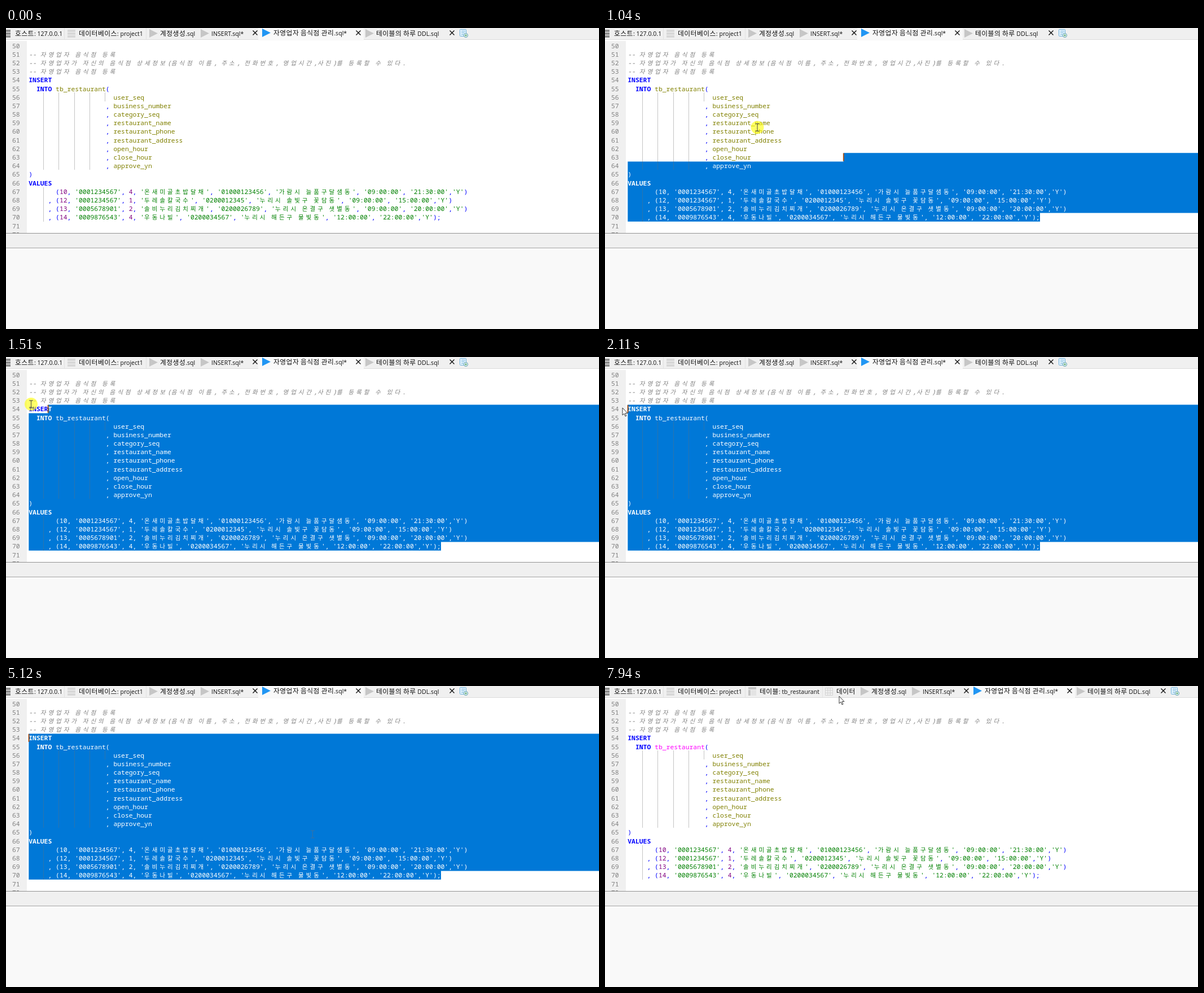
Recreate the animation shown at these times as an HTML page. Size 1051 by 533 pixels, loop 8 s.

```html
<!DOCTYPE html>
<html lang="ko">
<head>
<meta charset="utf-8">
<title>SQL editor</title>
<style>
html, body { margin: 0; width: 100%; height: 100%; overflow: hidden; background: #fff; }
#stage { position: relative; width: 1051px; height: 533px; overflow: hidden; }
#stage > * { position: absolute; left: 0; top: 0; }
svg { width: 1051px; height: 533px; overflow: visible; }
svg text { font: 10.6px "Open Sans", "Noto Sans", sans-serif; fill: #111; white-space: pre; }
svg .h { font: 11.8px "Noto Sans CJK KR", "Noto Sans CJK", sans-serif; letter-spacing: .45px; }
.code { box-sizing: border-box; width: 1051px; height: 363px; overflow: hidden; margin: 0; padding: 23.6px 0 0 40.3px;
  font: 11.38px/15.2px "Noto Sans Mono", "DejaVu Sans Mono", monospace; white-space: pre; }
.code div { height: 15.2px; }
.code i { display: inline-block; width: 13.656px; line-height: 0; font-style: inherit;
  font-family: "Noto Sans CJK KR", "Noto Sans CJK", sans-serif; font-size: 10.5px; }
#gutter { padding-left: 11px; color: #808080; }
.c { color: #808080; font-style: italic; }
.k { color: #00f; font-weight: bold; }
.p { color: #00f; }
.s { color: #008000; }
.d { color: #800080; }
.n, .t { color: #808000; }
.known .t { color: #f0f; }
#sel { background: #0078d7; }
#sel span { color: #fff; }
#caret { width: 1.5px; height: 14px; }
</style>
</head>
<body>
<div id="stage">
  <svg id="frame"></svg>
  <div id="gutter" class="code"></div>
  <div id="code" class="code"></div>
  <div id="sel" class="code"></div>
  <svg id="guides"></svg>
  <div id="caret"></div>
  <svg id="pointer">
    <circle r="11.5" fill="#ff0" fill-opacity=".6"/>
    <path id="arrow" d="M0 0V13L3 10.2 5 15 7 14.2 5 9.6H9Z" fill="#fff" stroke="#222" stroke-width=".9"/>
    <path id="beam" d="M-3.5-6.5H3.5M0-6.5V6.5M-3.5 6.5H3.5" fill="none"/>
    <path id="resize" d="M0-9L3.5-5H.8V5H3.5L0 9-3.5 5H-.8V-5H-3.5Z" fill="#222" stroke="#fff" stroke-width=".4"/>
  </svg>
</div>
<script>
const LOOP = 8000, TICK = 67, W = 1051;
const LEFT = 40.3, TOP = 23.6, CELL = 6.828, ROW = 15.2, LAST = 20, END = 771;
const $ = id => document.getElementById(id);
const rowTop = i => TOP + i * ROW;

const source = `
-- 자영업자 음식점 등록
-- 자영업자가 자신의 음식점 상세정보(음식점 이름, 주소, 전화번호, 영업시간,사진)를 등록할 수 있다.
-- 자영업자 음식점 등록
INSERT
  INTO tb_restaurant(
                      user_seq
                    , business_number
                    , category_seq
                    , restaurant_name
                    , restaurant_phone
                    , restaurant_address
                    , open_hour
                    , close_hour
                    , approve_yn
)
VALUES
       (10, '0001234567', 4, '온새미골초밥달채', '01000123456', '가람시 늘품구달샘동', '09:00:00', '21:30:00','Y')
     , (12, '0001234567', 1, '두레솔칼국수', '0200012345', '누리시 솔빛구 꽃담동', '09:00:00', '15:00:00','Y')
     , (13, '0005678901', 2, '솔비누리김치찌개', '0200026789', '누리시 은결구 샛별동', '09:00:00', '20:00:00','Y')
     , (14, '0009876543', 4, '우동나빌', '0200034567', '누리시 해든구 물빛동', '12:00:00', '22:00:00','Y');`;

// Syntax colours
const span = (cls, s) => `<span class="${cls}">${s}</span>`;
function kind(word) {
  if (word[0] === "'") return 's';
  if (/^\d/.test(word)) return 'd';
  if (/^[A-Z]/.test(word)) return 'k';
  if (word.startsWith('tb_')) return 't';
  return /^[a-z]/.test(word) ? 'n' : 'p';
}
function paint(line) {
  const html = line.startsWith('--') ? span('c', line)
    : line.replace(/'[^']*'|[A-Z]+|[a-z_]+|\d+|[(),;]/g, w => span(kind(w), w));
  return `<div>${html.replace(/[가-힣]/g, '<i>$&</i>')}</div>`;
}
$('code').innerHTML = $('sel').innerHTML = source.split('\n').map(paint).join('');
$('gutter').innerHTML = Array.from({ length: 23 }, (_, i) => `<div>${50 + i}</div>`).join('');

// Window frame and tabs
const rect = (x, y, w, h, fill) => `<rect x="${x}" y="${y}" width="${w}" height="${h}" fill="${fill}"/>`;
const path = (d, color, width = 1) => `<path d="${d}" fill="none" stroke="${color}" stroke-width="${width}"/>`;
const label = (x, s, y = 14) =>
  `<text x="${x}" y="${y}">${s.replace(/[가-힣]+/g, '<tspan class="h">$&</tspan>')}</text>`;
const play = (x, y = 2, fill = '#c6c6c6') => `<path d="M${x} ${y}l15 7.5-15 7.5z" fill="${fill}"/>`;
const cross = x => path(`M${x - 4} 4.5l8 8m0-8l-8 8`, '#111', 1.4);
const bars = (x, w, fill) => [3, 8, 13].map(y => rect(x, y, w, 4, fill)).join('');

const queries =
  play(254) + label(273, '계정생성.sql') +
  play(345) + label(364, 'INSERT.sql*') + cross(441.5) +
  rect(447, 0, 187, 22, '#f9f9f9') +
  play(454, 1, '#2196f3') + label(474, '자영업자 음식점 관리.sql*', 12.5) + cross(624.5) +
  play(637) + label(656, '테이블의 하루 DDL.sql') + cross(790.5) +
  `<rect x="804.5" y="2.5" width="11" height="12" rx="1" fill="#eaf5fc" stroke="#69b1de"/>` +
  path('M807 5.5h7M807 8.5h6M807 11.5h4', '#69b1de') +
  '<circle cx="815" cy="13" r="3.5" fill="#fff" stroke="#4b97a8"/>' + path('M813 13h4M815 11v4', '#3c9a5f');

const tableTabs =
  rect(254, 2, 14, 4, '#c4c4c4') + rect(254, 7, 4, 10, '#c4c4c4') + rect(259, 7, 9, 10, '#e4e4e4') +
  label(274, '테이블: tb_restaurant') + path('M385.5 0V20', '#e2e2e2') +
  path('M390.5 3.5h13v13h-13zM390.5 7.8h13M390.5 12.2h13M394.8 3.5v13M399.2 3.5v13', '#d2d2d2') +
  label(410, '데이터');

$('frame').innerHTML =
  rect(0, 0, W, 20, '#f0f0f0') + rect(0, 20, W, 1, '#dcdcdc') + rect(0, 23, 37, 340, '#f0f0f0') +
  rect(0, 363, W, 1, '#929292') + rect(0, 364, W, 25, '#f0f0f0') + rect(0, 389, W, 1, '#a5a5a5') +
  rect(0, 390, W, 143, '#f9f9f9') +
  path('M103.5 0V20M248.5 0V20', '#e2e2e2') +
  bars(0, 8, '#8c8c8c') + label(16, '호스트: 127.0.0.1') +
  bars(109, 14, '#d8d8d8') + label(129, '데이터베이스: project1') +
  `<g id="tableTabs">${tableTabs}</g><g id="queries">${queries}</g>`;

$('guides').innerHTML = path(
  'M66.5 114V251M93.5 114V251M121.5 114V251M148.5 114V251M175.5 114V130M66.5 282V343',
  'rgba(110,110,110,.4)');

// Pointer: time, x, y; a trailing 1 glides to the next stop, null hides it
const stops = [
  [0, null], [140, 921, 453], [210, 814.5, 364],
  [360, 804, 355, 1], [630, 783.5, 338.5], [770, 780, 337], [840, 766, 334], [900, 737, 330],
  [970, 424.5, 235.5], [1040, 270, 176], [1110, 185, 150], [1170, 156, 138],
  [1240, 152, 124, 1], [1510, 44.5, 83.5], [1580, 36, 82], [1640, 31, 81, 1], [1910, 30.5, 90.5],
  [2110, 31, 90, 1], [2320, 139, 97],
  [3530, 260, 170, 1], [3660, 542, 279, 1], [3800, 167, 252],
  [4460, 150, 220, 1], [4590, 100, 170],
  [4990, 683, 471], [5060, 610, 350], [5120, 543.5, 262.5], [5660, null],
  [7320, 20, 147, 1], [7600, 190, 75, 1], [7940, 415, 18]
];
function pointerAt(t) {
  const i = stops.findLastIndex(s => s[0] <= t);
  const [t0, x, y, glide] = stops[i];
  if (x === null) return null;
  if (!glide) return { x, y };
  const [t1, x1, y1] = stops[i + 1];
  const k = Math.floor((t - t0) / TICK) * TICK / (t1 - t0);
  return { x: x + (x1 - x) * k, y: y + (y1 - y) * k };
}

// The selection head trails the pointer by one tick
function headAt(t) {
  const p = pointerAt(Math.min(t, 2050) - TICK);
  const row = Math.min(LAST, Math.floor((p.y - TOP) / ROW));
  const cell = Math.max(0, Math.round((p.x - LEFT) / CELL));
  const x = LEFT + cell * CELL;
  return { row, x: row === LAST ? Math.min(END, x) : x };
}
function region({ row, x }) {
  const low = rowTop(LAST), bottom = low + ROW;
  const pts = row === LAST
    ? [[x, low], [END, low], [END, bottom], [x, bottom]]
    : [[x, rowTop(row)], [W, rowTop(row)], [W, low], [END, low], [END, bottom],
       [LEFT, bottom], [LEFT, rowTop(row + 1)], [x, rowTop(row + 1)]];
  return `polygon(${pts.map(([a, b]) => `${a}px ${b}px`).join(',')})`;
}

const show = (el, on) => { el.style.display = on ? '' : 'none'; };

function drawPointer(t, head) {
  const p = pointerAt(t);
  show($('pointer'), p);
  if (!p) return;
  const { x, y } = p;
  const resize = Math.abs(y - 364) < 4;
  const arrow = !resize && (x < 37 || y < 22 || y > 364);
  const onBlue = head && y > rowTop(head.row) && y < rowTop(LAST) && t > 2100;
  $('pointer').style.transform = `translate(${x}px,${y}px)`;
  show($('pointer').firstElementChild, t >= 560 && t < 2110);
  show($('arrow'), arrow);
  show($('resize'), resize);
  show($('beam'), !arrow && !resize);
  $('beam').setAttribute('stroke', onBlue ? '#3a71a3' : '#444');
}

function draw(t) {
  const selecting = t >= 770 && t < 5660;
  const head = selecting ? headAt(t) : null;
  show($('sel'), selecting);
  if (selecting) $('sel').style.clipPath = region(head);

  const at = head || { row: LAST, x: END };
  const blinkOn = t < 2480 || Math.floor((t - 2480) / 528) % 2 === 1;
  show($('caret'), t >= 560 && t < 5660 && blinkOn);
  $('caret').style.transform = `translate(${at.x - .8}px,${rowTop(at.row) + .5}px)`;
  $('caret').style.background = at.row === LAST ? '#222' : '#a9561f';

  $('code').classList.toggle('known', t >= 5660);
  show($('tableTabs'), t >= 7050);
  $('queries').setAttribute('transform', `translate(${t >= 7050 ? 199 : 0})`);
  drawPointer(t, head);
}

const start = performance.now();
function tick() {
  draw((performance.now() - start) % LOOP);
  requestAnimationFrame(tick);
}
tick();
</script>
</body>
</html>
```
